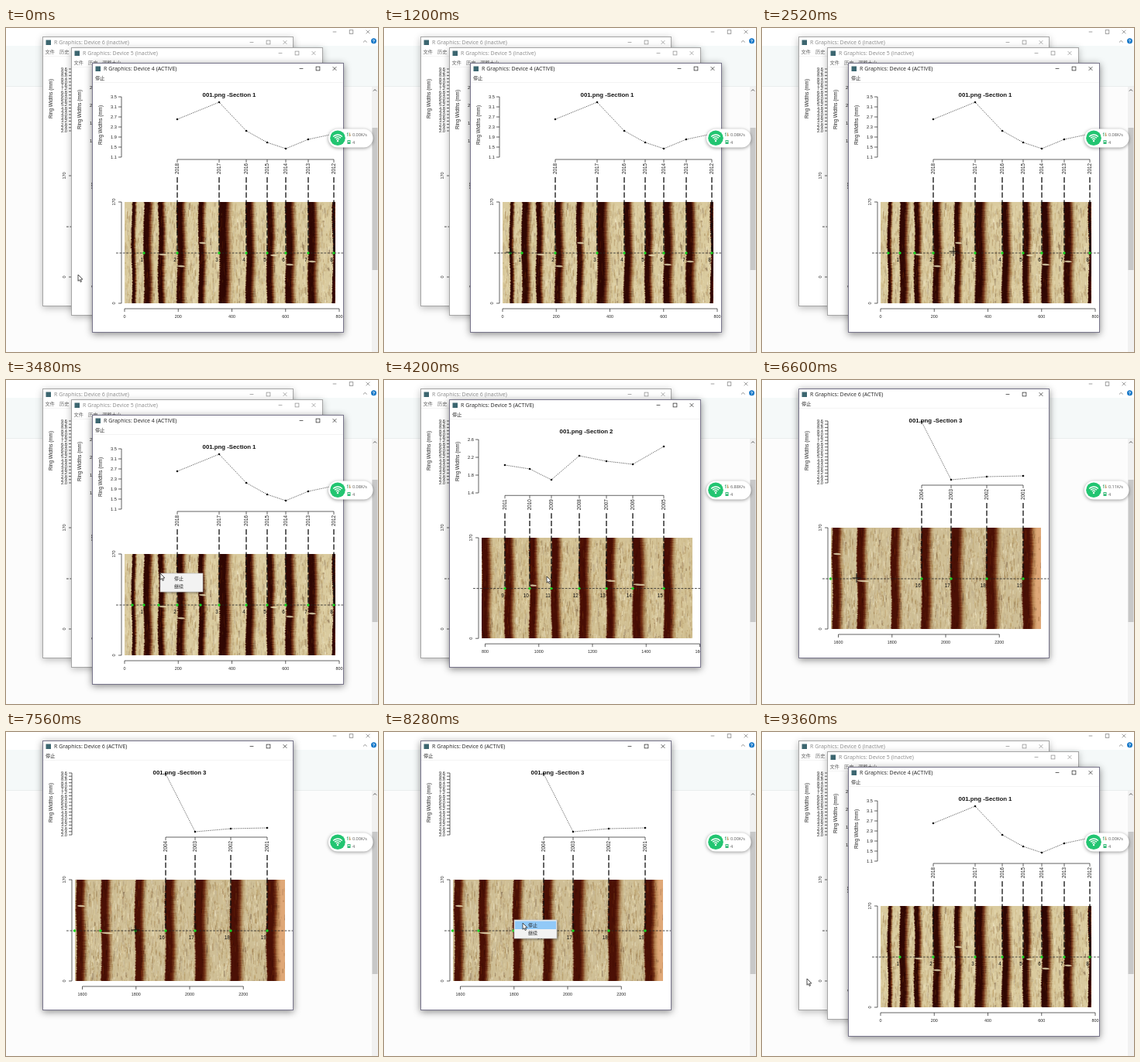
An HTML page with a canvas for the animation above (9.48 s loop, 480 by 419 pixels).

```html
<!DOCTYPE html>
<html lang="zh">
<head>
<meta charset="utf-8">
<style>
  html, body { margin: 0; width: 100%; height: 100%; overflow: hidden; background: #fcfcfc; }
  canvas { display: block; width: 480px; height: 419px; }
</style>
</head>
<body>
<canvas id="stage"></canvas>
<script>
const LOOP = 9480, STEP = 120;
const UI = '"Open Sans", "Noto Sans CJK SC", "Noto Sans CJK", sans-serif';
const PLOT = '"Liberation Sans", Arial, sans-serif';
const canvas = document.getElementById('stage');
const dpr = window.devicePixelRatio || 1;
canvas.width = 480 * dpr;
canvas.height = 419 * dpr;
const ctx = canvas.getContext('2d');
ctx.scale(dpr, dpr);

// Points are [x, y] on the stage; clicks are [time, x].
const devices = [
  { id: 6, x: 47, y: 11, w: 324, h: 349, section: 3, firstYear: 2004, firstLabel: 16,
    points: [[206, 54], [244, 129], [290, 125], [337, 124]],
    values: { from: 2, count: 20, top: 53, bottom: 133 },
    ruler: { from: 1600, x: 98.5, count: 4 },
    bands: [[91, 10], [123, 10], [167, 10], [206, 11], [244, 13], [290, 13], [337, 12]],
    cracks: [[92, 225, 10], [123, 260, 15]],
    clicks: [[5520, 88.5], [6720, 122], [7440, 167]],
    wood: ['#cfbf96', '#4b1005'], edgeTint: '#dfa878' },
  { id: 5, x: 84, y: 25, w: 325, h: 347, section: 2, firstYear: 2011, firstLabel: 9,
    points: [[156, 110], [188, 115], [216, 129], [252, 98], [287, 105], [321, 109], [361, 86]],
    values: { from: 1.4, count: 4, top: 77, bottom: 146 },
    ruler: { from: 800, x: 130.5, count: 5 },
    bands: [[126, 10], [156, 10], [188, 9], [216, 10], [252, 11], [287, 10], [321, 13], [361, 11]],
    cracks: [[287, 260, 12], [321, 265, 16], [188, 266, 9]],
    clicks: [], wood: ['#d3c295', '#480d04'] },
  { id: 4, x: 111, y: 45, w: 325, h: 349, section: 1, firstYear: 2018, firstLabel: 2,
    points: [[221, 118], [275, 96], [310, 133], [337, 148], [361, 156], [390, 144], [423, 137]],
    values: { from: 1.1, count: 7, top: 89, bottom: 167 },
    ruler: { from: 0, x: 153, count: 5 },
    bands: [[163, 4], [178, 9], [197, 7], [221, 9], [249, 7], [275, 12], [310, 9], [337, 8],
            [361, 10], [390, 10], [422, 4]],
    cracks: [[249, 278, 9], [197, 293, 11], [221, 308, 10], [361, 306, 10], [390, 302, 10], [341, 294, 9]],
    extraDot: 178, clicks: [[1080, 163], [1920, 197], [2760, 251]],
    wood: ['#dacb9f', '#310703'] },
];

const closing = { 4: 4080, 5: 4920 };
const REOPEN = 8760;
const popups = [
  { from: 3480, to: 4080, x: 199, y: 250 },
  { from: 4560, to: 4920, x: 160, y: 248 },
  { from: 7800, to: 8760, x: 168, y: 243 },
];
const pointerPath = [
  [0, 93, 319], [240, 93, 319], [960, 163, 290], [1200, 163, 290], [1800, 197, 290],
  [2040, 197, 290], [2520, 247, 289], [2700, 251, 290], [2880, 251, 290], [3480, 199, 250],
  [3840, 210, 254], [4320, 210, 254], [4560, 160, 248], [4800, 171, 254], [4920, 171, 254],
  [5240, 88, 257], [5640, 88, 257], [6480, 122, 256], [6840, 122, 256], [7320, 167, 256],
  [7560, 167, 256], [7800, 168, 243], [8160, 179, 247], [8640, 179, 247], [9360, 58, 319], [9480, 93, 319],
];
const speeds = [[0, '0.00'], [1200, '0.08'], [3720, '6.88'], [4680, '0.08'], [6000, '0.11'], [7440, '0.00']];

function random(seed) {
  return () => (seed = (seed * 16807) % 2147483647) / 2147483647;
}

function line(points, color = '#222', width = 0.7, dash = []) {
  ctx.strokeStyle = color;
  ctx.lineWidth = width;
  ctx.setLineDash(dash);
  ctx.beginPath();
  points.forEach(([x, y]) => ctx.lineTo(x, y));
  ctx.stroke();
  ctx.setLineDash([]);
}

function rect(x, y, w, h, color) {
  ctx.fillStyle = color;
  ctx.fillRect(x, y, w, h);
}

function disc(x, y, r, color) {
  ctx.fillStyle = color;
  ctx.beginPath();
  ctx.arc(x, y, r, 0, 7);
  ctx.fill();
}

function text(str, x, y, { size = 6.3, font = PLOT, color = '#222', align = 'center', weight = '', turn = 0 } = {}) {
  ctx.save();
  ctx.translate(x, y);
  ctx.rotate(turn);
  ctx.font = `${weight} ${size}px ${font}`;
  ctx.textAlign = align;
  ctx.textBaseline = 'alphabetic';
  ctx.fillStyle = color;
  ctx.fillText(str, 0, size * 0.36);
  ctx.restore();
}

// Wood strip: grain streaks, then dark rings with a ragged edge fading to the right.
function paintWood(dev) {
  const w = 272, h = 131, scale = 2;
  const strip = document.createElement('canvas');
  strip.width = w * scale;
  strip.height = h * scale;
  const g = strip.getContext('2d');
  const rnd = random(dev.id * 7919);
  const [light, dark] = dev.wood;
  g.scale(scale, scale);
  g.fillStyle = light;
  g.fillRect(0, 0, w, h);
  const left = dev.x + 42, top = dev.y + 180 * dev.h / 349;

  const grain = (count, colors, alpha) => {
    for (let i = 0; i < count; i++) {
      g.globalAlpha = alpha * rnd();
      g.fillStyle = colors[Math.floor(rnd() * colors.length)];
      g.fillRect(rnd() * w, rnd() * h, 0.6 + rnd() * 1.2, 1 + rnd() * 9);
    }
    g.globalAlpha = 1;
  };
  grain(5000, ['#f4ecd0', '#eee0b4', '#9b7a45', '#b99b62', '#b5a58b'], 0.45);

  if (dev.edgeTint) {
    const tint = g.createLinearGradient(w - 22, 0, w - 10, 0);
    tint.addColorStop(0, dev.edgeTint + '00');
    tint.addColorStop(1, dev.edgeTint);
    g.fillStyle = tint;
    g.fillRect(w - 22, 0, 22, h);
  }

  for (const [x, width] of dev.bands) {
    const span = width * 1.55;
    const fade = g.createLinearGradient(-1, 0, span, 0);
    [[0, '#6b250800'], [0.1, dark], [0.48, dark], [0.64, '#6a2409dd'], [0.78, '#93602f88'], [1, '#b08a5000']]
      .forEach(([at, color]) => fade.addColorStop(at, color));
    const phase = rnd() * 6;
    for (let y = 0; y < h; y++) {
      const shift = 0.7 * Math.sin(y / 17 + phase) + (rnd() - 0.5) * 0.9;
      g.save();
      g.translate(x - left + shift, y);
      g.fillStyle = fade;
      g.fillRect(-1, 0, span + 1, 1);
      g.restore();
    }
    for (let i = 0; i < 55; i++) {
      g.globalAlpha = 0.35 * rnd();
      g.fillStyle = rnd() < 0.5 ? '#a04a12' : '#180201';
      g.fillRect(x - left + rnd() * width * 1.3, rnd() * h, 0.7, 2 + rnd() * 10);
    }
    g.globalAlpha = 1;
  }
  grain(500, ['#3d1a08', '#7a4a1c'], 0.3);

  for (const [x, y, len] of dev.cracks) {
    g.fillStyle = '#efe4bcc8';
    g.beginPath();
    g.ellipse(x - left + len / 2, y - top, len / 2, 1.2, 0.06, 0, 7);
    g.fill();
  }
  return strip;
}

function windowButtons(x, y, gap, r, color) {
  line([[x - r, y], [x + r, y]], color);
  ctx.strokeStyle = color;
  ctx.strokeRect(x + gap - r, y - r, 2 * r, 2 * r);
  const c = x + 2 * gap;
  line([[c - r, y - r], [c + r, y + r]], color);
  line([[c - r, y + r], [c + r, y - r]], color);
}

function drawDesktop() {
  rect(0, 0, 480, 419, '#fcfcfc');
  rect(0, 0, 480, 23, '#fff');
  rect(0, 23, 480, 53, '#f5f9f9');
  line([[0, 75.5], [480, 75.5]], '#e6eaea');
  windowButtons(424, 5, 21.5, 2.3, '#777');
  line([[461, 18.5], [463.3, 16.3], [465.6, 18.5]], '#666');
  disc(474.5, 16.8, 3.5, '#1778c8');
  text('?', 474.5, 16.8, { size: 5.5, color: '#fff', weight: 'bold' });
  rect(472, 76, 8, 343, '#f1f1f1');
  rect(472.5, 129, 7, 184, '#c8c8c8');
  line([[474, 81.5], [476, 79.5], [478, 81.5]], '#555', 1);
}

function drawFrame({ id, x, y, w, h }, active) {
  ctx.save();
  ctx.shadowColor = active ? '#0007' : '#0004';
  ctx.shadowBlur = 9 * dpr;
  ctx.shadowOffsetY = 2 * dpr;
  rect(x, y, w, h, '#fff');
  ctx.restore();
  ctx.lineWidth = 1;
  ctx.strokeStyle = active ? '#77748a' : '#a5a5a5';
  ctx.strokeRect(x + 0.5, y + 0.5, w - 1, h - 1);

  const ink = active ? '#222' : '#8b8b8b';
  rect(x + 4.5, y + 4.5, 6.5, 6.5, '#3c6670');
  text(`R Graphics: Device ${id} (${active ? 'ACTIVE' : 'inactive'})`, x + 15, y + 7.5,
    { size: 7, font: UI, color: ink, align: 'left' });
  windowButtons(x + 270, y + 7.5, 21.5, 2.4, ink);
  const menu = active ? [['停止', 4]] : [['文件', 3.5], ['历史', 22], ['调整大小', 40]];
  menu.forEach(([label, dx]) =>
    text(label, x + dx, y + 20, { size: 6.2, font: UI, color: active ? '#222' : '#666', align: 'left' }));
  line([[x + 1, y + 25.5], [x + w - 1, y + 25.5]], '#f0f0f0');
}

function drawPlot(dev, t) {
  const { x, y, w, h, points, values, ruler } = dev;
  const at = dy => y + dy * h / 349;
  const axisX = x + 38, up = -Math.PI / 2;

  text(`001.png -Section ${dev.section}`, x + 177, y + 41, { size: 7.8, weight: 'bold', color: '#111' });
  text('Ring Widths (mm)', x + 11, y + 80.5, { size: 6.4, turn: up });

  line([[axisX, values.top], [axisX, values.bottom]]);
  for (let i = 0; i < values.count; i++) {
    const ty = values.bottom + (values.top - values.bottom) * i / (values.count - 1);
    line([[axisX - 4, ty], [axisX, ty]]);
    text((values.from + 0.4 * i).toFixed(1), x + 32, ty, { size: 5.7, align: 'right' });
  }
  line(points, '#333', 0.8, [1.2, 1.2]);
  points.forEach(([px, py]) => disc(px, py, 1.3, '#111'));

  const yearY = at(125);
  line([[points[0][0], yearY], [points[points.length - 1][0], yearY]]);
  points.forEach(([px], i) => {
    line([[px, yearY], [px, yearY + 4]]);
    text(dev.firstYear - i, px, at(137), { turn: up });
  });

  const top = at(180), bottom = at(311), middle = at(246);
  ctx.drawImage(dev.strip, x + 42, top, w > 324 ? 272 : 271, bottom - top);
  line([[axisX, top], [axisX, bottom]]);
  [['170', top], ['0', bottom]].forEach(([label, ty]) => {
    line([[axisX - 4, ty], [axisX, ty]]);
    text(label, x + 28.5, ty, { size: 5.5, turn: up });
  });

  const rulerY = at(318), endX = ruler.x + 69.25 * (ruler.count - 1);
  line([[ruler.x, rulerY], [endX, rulerY]]);
  for (let i = 0; i < ruler.count; i++) {
    const tx = ruler.x + 69.25 * i;
    line([[tx, rulerY], [tx, rulerY + 4]]);
    text(ruler.from + 200 * i, tx, at(328), { size: 5.4 });
  }

  line([[x + 31, middle], [x + w, middle]], '#222', 0.8, [2.8, 1.6]);
  points.forEach(([px], i) => {
    line([[px, at(148)], [px, middle]], '#111', 1.3, [7, 2.8]);
    text(dev.firstLabel + i, px - 1.3, middle + 9, { align: 'right', color: '#111' });
  });
  if (dev.extraDot) text('1', dev.extraDot - 1, middle + 9, { align: 'right', color: '#111' });
  const clicked = dev.clicks.filter(([when]) => t >= when && t < REOPEN).map(([, px]) => px);
  [...points.map(p => p[0]), dev.extraDot, ...clicked].forEach(px => px && disc(px, middle, 1.7, '#16d51f'));
}

function drawWindow(dev, active, t) {
  drawFrame(dev, active);
  ctx.save();
  ctx.beginPath();
  ctx.rect(dev.x + 1, dev.y + 26, dev.w - 2, dev.h - 27);
  ctx.clip();
  drawPlot(dev, t);
  ctx.restore();
}

function drawNetworkPill(t) {
  ctx.save();
  ctx.shadowColor = '#0006';
  ctx.shadowBlur = 4 * dpr;
  ctx.shadowOffsetY = dpr;
  ctx.fillStyle = '#fff';
  ctx.beginPath();
  ctx.roundRect(416, 130.5, 57.5, 24, 12);
  ctx.fill();
  ctx.restore();
  disc(428, 142.3, 9.8, '#22c571');
  ctx.strokeStyle = '#fff';
  ctx.lineWidth = 1.3;
  [2.8, 5.4, 8].forEach(r => {
    ctx.beginPath();
    ctx.arc(428, 146, r, -Math.PI * 0.76, -Math.PI * 0.24);
    ctx.stroke();
  });
  disc(428, 146, 1.2, '#fff');
  line([[441, 140], [441, 135.5], [440, 137]], '#4aa878', 0.9);
  line([[443.5, 135.5], [443.5, 140], [444.5, 138.5]], '#b48b50', 0.9);
  rect(440.5, 145, 4, 5, '#31b974');
  rect(441.5, 146, 2, 1.5, '#fff');
  const speed = speeds.filter(([from]) => t >= from).pop()[1];
  const style = { size: 5.5, font: UI, color: '#555', align: 'left' };
  text(`${speed}K/s`, 447, 137.7, style);
  text('4', 447, 147.7, style);
}

function drawPopup({ x, y }, pointer) {
  ctx.save();
  ctx.shadowColor = '#0006';
  ctx.shadowBlur = 3 * dpr;
  ctx.shadowOffsetX = ctx.shadowOffsetY = 1.5 * dpr;
  rect(x, y, 55, 24, '#f2f2f2');
  ctx.restore();
  ctx.strokeStyle = '#bbb';
  ctx.lineWidth = 0.7;
  ctx.strokeRect(x, y, 55, 24);
  if (pointer.x > x + 2) rect(x + 1, y + 1.5, 53, 10.5, '#91c9f7');
  text('停止', x + 18, y + 7, { size: 6, font: UI, align: 'left' });
  text('继续', x + 18, y + 17.3, { size: 6, font: UI, align: 'left' });
}

function pointerAt(t) {
  const i = pointerPath.findIndex(([when]) => when > t);
  const [t0, x0, y0] = pointerPath[i - 1], [t1, x1, y1] = pointerPath[i];
  const p = (t - t0) / (t1 - t0), e = p * p * (3 - 2 * p);
  return { x: x0 + (x1 - x0) * e, y: y0 + (y1 - y0) * e };
}

function drawPointer({ x, y }, arrow) {
  if (!arrow) {
    line([[x - 5.5, y], [x + 5.5, y]], '#111', 1);
    line([[x, y - 6], [x, y + 6]], '#111', 1);
    return;
  }
  ctx.beginPath();
  [[0, 0], [0, 8.3], [1.9, 6.6], [3.2, 9.5], [4.5, 8.9], [3.3, 6.1], [5.9, 6]]
    .forEach(([dx, dy]) => ctx.lineTo(x + dx, y + dy));
  ctx.closePath();
  ctx.fillStyle = '#fff';
  ctx.fill();
  ctx.strokeStyle = '#222';
  ctx.lineWidth = 0.8;
  ctx.stroke();
}

function render(now) {
  const t = Math.floor((now % LOOP) / STEP) * STEP;
  const open = devices.filter(d => !closing[d.id] || t < closing[d.id] || t >= REOPEN);
  const active = open[open.length - 1];
  const pointer = pointerAt(t);
  const popup = popups.find(p => t >= p.from && t < p.to);
  const justSwitched = t >= closing[4] && t < closing[4] + 240;

  drawDesktop();
  open.forEach(dev => drawWindow(dev, dev === active, t));
  drawNetworkPill(t);
  if (popup) drawPopup(popup, pointer);
  drawPointer(pointer, popup || justSwitched || pointer.x < active.x);
}

devices.forEach(dev => { dev.strip = paintWood(dev); });
const start = performance.now();
function loop() {
  render(performance.now() - start);
  requestAnimationFrame(loop);
}
loop();
</script>
</body>
</html>
```
